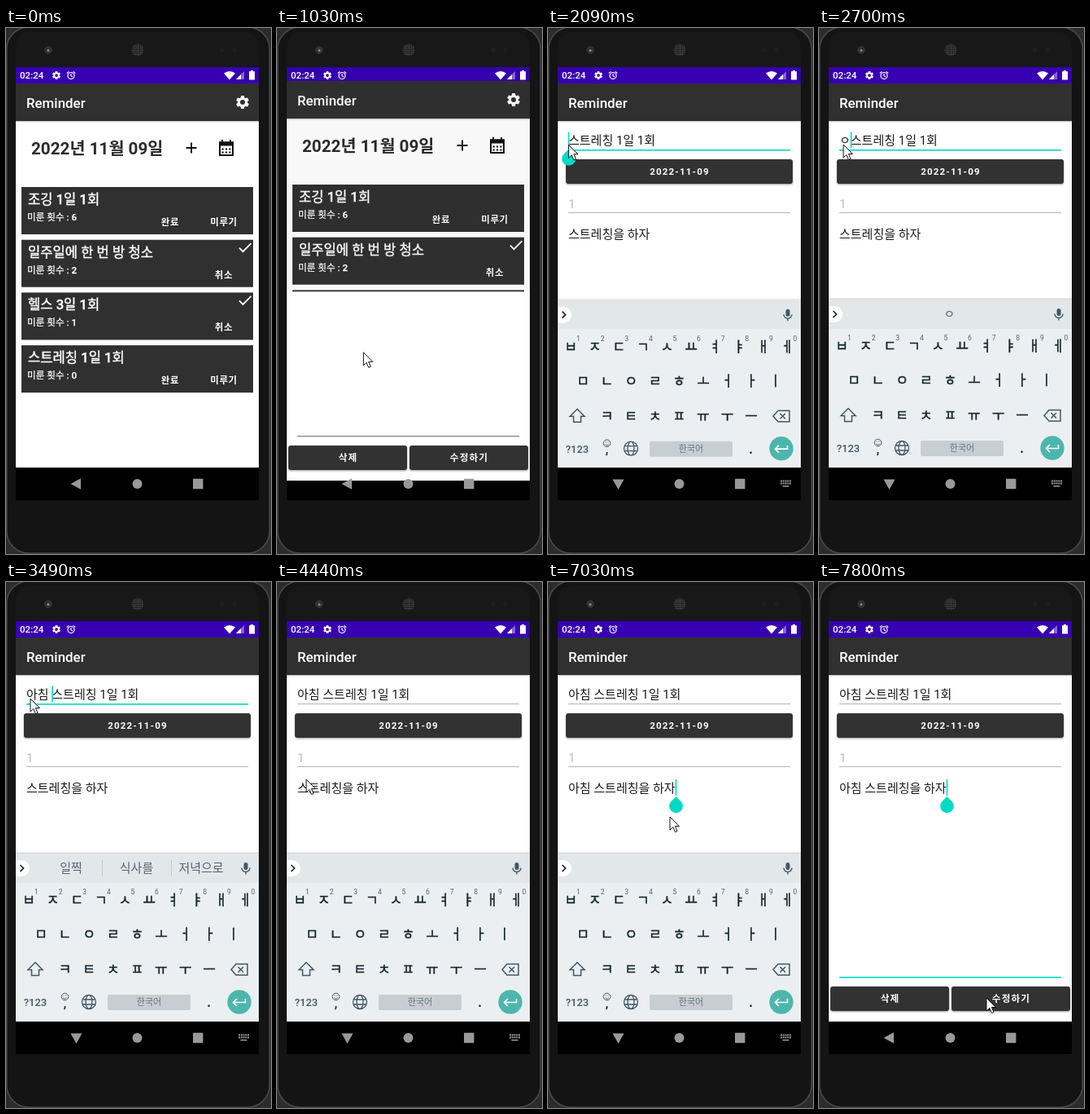
An HTML page for the animation above (8000 ms loop, 326x645 px).

```html
<!DOCTYPE html>
<html lang="ko">
<head>
<meta charset="utf-8">
<title>Reminder</title>
<style>
html, body { margin: 0; width: 100%; height: 100%; overflow: hidden; background: #2c2c2c; }
svg { display: block; width: 100%; height: 100%; font-family: Roboto, 'Noto Sans CJK KR', 'Noto Sans CJK', sans-serif; }
text { white-space: pre; }
</style>
</head>
<body>
<svg id="stage" viewBox="0 0 326 645">
  <defs>
    <clipPath id="screen"><rect x="12" y="48" width="299" height="531"/></clipPath>
    <clipPath id="content"><rect x="12" y="48" width="299" height="491"/></clipPath>
    <clipPath id="reveal"><rect id="revealBox" x="12" y="48" width="299" height="531"/></clipPath>
    <filter id="raise" x="-5%" y="-20%" width="110%" height="150%">
      <feDropShadow dx="0" dy="1" stdDeviation="1" flood-color="#000" flood-opacity=".4"/>
    </filter>
    <pattern id="mesh" width="2.6" height="2.6" patternUnits="userSpaceOnUse">
      <rect width="2.6" height="2.6" fill="#1c1c1c"/><circle cx="1.3" cy="1.3" r=".8" fill="#585858"/>
    </pattern>
    <path id="gear" d="M19.14 12.94a7 7 0 0 0 0-1.88l2.03-1.58a.5.5 0 0 0 .12-.61l-1.92-3.32a.5.5 0 0 0-.59-.22l-2.39.96a7 7 0 0 0-1.62-.94l-.36-2.54a.5.5 0 0 0-.48-.41h-3.84a.5.5 0 0 0-.47.41l-.36 2.54a7 7 0 0 0-1.62.94l-2.39-.96a.5.5 0 0 0-.59.22L2.74 8.87a.5.5 0 0 0 .12.61l2.03 1.58a7 7 0 0 0 0 1.88l-2.03 1.58a.5.5 0 0 0-.12.61l1.92 3.32a.5.5 0 0 0 .59.22l2.39-.96a7 7 0 0 0 1.62.94l.36 2.54a.5.5 0 0 0 .48.41h3.84a.5.5 0 0 0 .47-.41l.36-2.54a7 7 0 0 0 1.62-.94l2.39.96a.5.5 0 0 0 .59-.22l1.92-3.32a.5.5 0 0 0-.12-.61zM12 15.6a3.6 3.6 0 1 1 0-7.2 3.6 3.6 0 0 1 0 7.2z"/>
  </defs>

  <!-- phone body -->
  <rect width="326" height="645" fill="#2c2c2c"/>
  <rect x=".8" y="-1" width="323.5" height="645" rx="27" fill="#141414" stroke="#484848" stroke-width="1.6"/>
  <path d="M30 5H292Q311 5 311 26V48H12V26Q12 5 30 5Z" fill="#181818"/>
  <circle cx="52" cy="27" r="4.2" fill="#2c2e31" stroke="#3d3d3d"/>
  <circle cx="52" cy="27.5" r="1.6" fill="#7f8894"/>
  <circle cx="162" cy="27" r="7.6" fill="url(#mesh)"/>
  <circle cx="266" cy="27" r="3" fill="#1f1f1f"/><circle cx="281" cy="27" r="3" fill="#1d1d1d"/>

  <g clip-path="url(#screen)">
    <rect x="12" y="48" width="299" height="531" fill="#000"/>
    <g id="list"></g>
    <rect id="scrim" x="12" y="48" width="299" height="531" fill="#000"/>
    <g clip-path="url(#reveal)"><g id="detail"></g></g>
    <g clip-path="url(#content)"><g id="keyboard"></g></g>
    <g id="status"></g>
    <g fill="#999">
      <path id="back"/>
      <circle cx="161.5" cy="559" r="6"/>
      <rect x="230" y="552.8" width="12.4" height="12.4" rx=".6"/>
      <g id="imeIcon">
        <path d="M286 555.5h13M286 558.5h13" stroke="#999" stroke-width="2" stroke-dasharray="2 .75" fill="none"/>
        <path d="M288.5 561h8v1.5h-8z"/>
      </g>
    </g>
  </g>
  <path id="pointer" d="M0 0V16L3.8 12.5L6.4 18.6L9 17.5L6.4 11.5H11.4Z" fill="#fff" stroke="#111" stroke-width="1" stroke-linejoin="round"/>
</svg>

<script>
const LOOP = 8000;
const DARK = '#303030', TEAL = '#03dac5', KEY = '#14262e', ICON = '#405863';
const $ = id => document.getElementById(id);
const clamp = v => Math.max(0, Math.min(1, v));
const smooth = v => v * v * (3 - 2 * v);
const easeOut = (v, power = 3) => 1 - (1 - v) ** power;
const set = (el, attrs) => { for (const k in attrs) el.setAttribute(k, attrs[k]); };
const show = (id, on) => $(id).setAttribute('visibility', on ? 'visible' : 'hidden');

const rect = (x, y, w, h, fill, extra = '') =>
  `<rect x="${x}" y="${y}" width="${w}" height="${h}" fill="${fill}" ${extra}/>`;
const text = (x, y, size, fill, str, extra = '') =>
  `<text x="${x}" y="${y}" font-size="${size}" fill="${fill}" ${extra}>${str}</text>`;
const mid = (x, y, size, fill, str, extra = '') =>
  text(x, y, size, fill, str, 'text-anchor="middle" ' + extra);
const stroke = (d, color, width = 1.5, extra = '') =>
  `<path d="${d}" fill="none" stroke="${color}" stroke-width="${width}" ${extra}/>`;
const heavy = (color, width) => `font-weight="500" stroke="${color}" stroke-width="${width}"`;
const gear = (x, y, size) =>
  `<use href="#gear" fill="#fff" transform="translate(${x - size / 2} ${y - size / 2}) scale(${size / 24})"/>`;

// Window background with its system bars and title
const page = () =>
  rect(12, 68, 299, 471, '#fff') + rect(12, 539, 299, 40, '#000') +
  rect(12, 48, 299, 20, '#3700b3') + rect(12, 114, 299, 1, '#ccc') + rect(12, 115, 299, 1, '#eee') +
  rect(12, 68, 299, 46, DARK) + text(25, 97.8, 16.9, '#fff', 'Reminder', 'font-weight="500"');

function card(title, count, done, i) {
  const y = 195 + i * 64.7;
  const label = (x, str) => mid(x, y + 47, 11.4, '#fff', str, 'font-weight="700" letter-spacing=".7"');
  return rect(19, y, 285, 58, DARK) +
    text(27, y + 21, 16.6, '#fff', title, heavy('#fff', .4)) +
    text(26, y + 41, 11.6, '#fff', '미룬 횟수 : ' + count, heavy('#fff', .25)) +
    (done ? label(268, '취소') + stroke(`M287 ${y + 10}l4.5 4.5 10-10`, '#fff', 1.8)
          : label(202, '완료') + label(268, '미루기'));
}

function buildList() {
  const calendar = stroke('M263 140.5H279V156H263Z', '#111', 2) + rect(262, 139.5, 18, 5, '#111') +
    rect(265, 137, 2, 4, '#111') + rect(275, 137, 2, 4, '#111') +
    stroke('M265.5 148.5h11M265.5 152.5h11', '#111', 2, 'stroke-dasharray="2.2 2.2"');
  $('list').innerHTML = page() + gear(291, 91, 20) +
    text(31, 154.5, 20.7, '#2b2b2b', '2022년 11월 09일', 'font-weight="700"') +
    stroke('M221.5 147h13M228 140.5v13', '#111', 2) + calendar +
    [['조깅 1일 1회', 6, 0], ['일주일에 한 번 방 청소', 2, 1], ['헬스 3일 1회', 1, 1], ['스트레칭 1일 1회', 0, 0]]
      .map((c, i) => card(...c, i)).join('');
}

const button = (x, y, w, str) =>
  rect(x, y, w, 30, DARK, 'rx="3" filter="url(#raise)"') +
  mid(x + w / 2 + .5, y + 19.3, 11.6, '#fff', str, 'font-weight="700" letter-spacing="1.15"');

function buildDetail() {
  const line = (id, y) => rect(25, y, 273, 1, '#b5b5b5', `id="${id}"`);
  $('detail').innerHTML = page() +
    line('titleLine', 149) + text(25, 142.5, 15, '#1c1c1c', '', 'id="title"') +
    button(22, 161, 279, '2022-11-09') +
    text(25, 220.5, 15, '#bdbdbd', '1') + line('countLine', 226) +
    text(25, 257.5, 15, '#1c1c1c', '', 'id="memo"') + line('memoLine', 484) +
    button(14, 496, 146, '삭제') + button(163, 496, 146, '수정하기') +
    rect(-.8, 0, 1.6, 20, TEAL, 'id="caret"') +
    `<path id="handle" d="M0 0L6 6A8.4 8.4 0 1 1 -6 6Z" fill="${TEAL}"/>`;
}

function buildKeyboard() {
  const row = (keys, x, y) =>
    [...keys].map((k, i) => mid(x + i * 29.6, y + 6, 17, KEY, k, heavy(KEY, .4))).join('');
  const digits = [...'1234567890'].map((d, i) => mid(37.5 + i * 29.6, 383, 8.5, '#53656e', d)).join('');
  $('keyboard').innerHTML =
    rect(12, 331, 299, 1, '#eee') + rect(12, 332, 299, 1, '#d8d8d8') +
    rect(12, 333, 299, 36, '#e2e7e9') + rect(12, 369, 299, 170, '#ebeff2') +
    '<path d="M12 341H19a10 10 0 0 1 0 20H12Z" fill="#fff"/>' + stroke('M17.5 347l4 4-4 4', '#222', 1.7) +
    rect(292.5, 344, 5, 9, ICON, 'rx="2.5"') + stroke('M290 350.5a5 5 0 0 0 10 0M295 355.5v3', ICON, 1.4) +
    '<g id="hints">' + [80, 160.5, 240].map(x => mid(x, 356.3, 15, '#53656e', '')).join('') +
    stroke('M118.5 341v20M203.5 341v20', '#c6cdd1', 1) + '</g>' +
    row('ㅂㅈㄷㄱㅅㅛㅕㅑㅐㅔ', 28, 390) + digits +
    row('ㅁㄴㅇㄹㅎㅗㅓㅏㅣ', 43, 432) + row('ㅋㅌㅊㅍㅠㅜㅡ', 72.5, 475) +
    stroke('M36 466.5L45 475.5H40.5V482.5H31.5V475.5H27Z', ICON) +
    stroke('M283 468.5H297V482H283L277 475.2ZM285.5 472l6.5 6.5M292 472l-6.5 6.5', ICON) +
    mid(36, 520, 13, ICON, '?123', 'font-weight="500"') +
    stroke('M68.2 508.5a4.3 4.3 0 1 0 8.6 0a4.3 4.3 0 1 0-8.6 0M70.3 510q2.2 2.4 4.4 0M70.6 507h1M73.5 507h1', ICON, 1) +
    mid(72.5, 521.5, 14, KEY, ',', 'font-weight="700"') +
    stroke('M93.5 515a8.5 8.5 0 1 0 17 0a8.5 8.5 0 1 0-17 0M98 515a4 8.5 0 1 0 8 0a4 8.5 0 1 0-8 0M94.5 512h15M94.5 518h15', ICON, 1.3) +
    rect(125, 506, 102, 19, '#c7ced1', 'rx="2"') + mid(176, 519.3, 11, '#65757d', '한국어') +
    mid(249.5, 521, 16, KEY, '.', 'font-weight="700"') +
    '<circle cx="287" cy="515" r="14.7" fill="#4db6ac"/>' +
    stroke('M294.5 511v4.5H280M284 511l-4.5 4.5 4.5 4.5', '#fff', 1.7);
}

function buildStatus() {
  $('status').innerHTML = text(17, 62.2, 11.6, '#fff', '02:24', 'font-weight="500"') + gear(62, 58, 12.5) +
    '<circle cx="80" cy="58.5" r="4" fill="none" stroke="#fff" stroke-width="1.2"/>' +
    stroke('M80 56v2.8l2 1.2M74.8 55.5l2.6-2.2M85.2 55.5l-2.6-2.2', '#fff', 1.1) +
    '<path d="M268 55.5Q275 50.5 282 55.5L275 63.5Z" fill="#fff"/>' +
    '<path d="M293 53V63H283Z" fill="#fff" opacity=".4"/><path d="M289 57V63H283Z" fill="#fff"/>' +
    '<path d="M299 53.3h2v-1.3h3v1.3h2V63.5h-7Z" fill="#fff"/>';
}

// Pointer stops: time, x, y
const PATH = [
  [130, 284, 616], [830, 106, 424], [960, 106, 424], [1240, 108, 260], [1730, 26, 143], [2000, 26, 143],
  [2560, 17, 147], [2700, 30, 143], [3820, 30, 143], [4400, 36, 242], [4590, 36, 242], [4730, 9, 222],
  [6200, 9, 222], [6700, 152, 254], [6760, 152, 254], [6830, 150, 288], [7100, 150, 288], [7760, 206, 510]
];

// Edits: time, field, typed prefix, suggestions, caret x, handle
const NEXT = ['일찍', '식사를', '저녁으로'];
const NEAR = ['야', '아', '어'], WORD = ['아치', '아침', '아침에'];
const NONE = ['', '', ''], only = s => ['', s, ''];
const EDITS = [
  [0, '', '', NONE, 0, 0],
  [1830, 'title', '', NONE, 25.5, 1],
  [2500, 'title', 'ㅇ', only('ㅇ'), 39.5, 0],
  [2900, 'title', '아', NEAR, 39.5, 0],
  [3030, 'title', '앛', only('앛'), 39.5, 0],
  [3290, 'title', '아치', only('아치'), 53, 0],
  [3360, 'title', '아침', WORD, 53, 0],
  [3490, 'title', '아침 ', NEXT, 57, 0],
  [4400, '', '', NONE, 0, 0],
  [4570, 'memo', '', NONE, 39.5, 1],
  [4930, 'memo', '', NONE, 25.5, 0],
  [5400, 'memo', 'ㅇ', only('ㅇ'), 39.5, 0],
  [5480, 'memo', '아', NEAR, 39.5, 0],
  [5600, 'memo', '앛', only('앛'), 39.5, 0],
  [5700, 'memo', '아치', only('아치'), 53, 0],
  [5800, 'memo', '아침', WORD, 53, 0],
  [6000, 'memo', '아침 ', NEXT, 57, 0],
  [6750, 'memo', '아침 ', NEXT, 157.5, 1],
  [7030, 'memo', '아침 ', NONE, 157.5, 1]
];

function pointerAt(t) {
  let i = 0;
  while (i < PATH.length - 2 && t >= PATH[i + 1][0]) i++;
  const [a, b] = [PATH[i], PATH[i + 1]];
  const k = smooth(clamp((t - a[0]) / (b[0] - a[0])));
  return [a[1] + (b[1] - a[1]) * k, a[2] + (b[2] - a[2]) * k];
}

function drawLine(id, focused, idle) {
  set($(id), focused ? { fill: TEAL, height: 1.6 } : { fill: idle, height: 1 });
}

function drawEdit(t) {
  const past = EDITS.filter(e => e[0] <= t);
  const [, field, , hints, x, handle] = past[past.length - 1];
  const typed = name => past.reduce((s, e) => e[1] === name ? e[2] : s, '');
  $('title').textContent = typed('title') + '스트레칭 1일 1회';
  $('memo').textContent = typed('memo') + '스트레칭을 하자';

  // The blink restarts when the text or the caret position changes
  const [since] = past.filter((e, i) => !i || e[2] !== past[i - 1][2] || e[4] !== past[i - 1][4]).pop();
  const top = field === 'title' ? 127.5 : 242;
  set($('caret'), { transform: `translate(${x} ${top})` });
  set($('handle'), { transform: `translate(${x} ${top + 21})` });
  show('caret', field && (t - since) % 1000 < 500);
  show('handle', handle);
  drawLine('titleLine', field === 'title', t < 1830 ? '#6e6e6e' : '#b5b5b5');
  drawLine('memoLine', field === 'memo', '#6e6e6e');

  const [a, b, c, rules] = $('hints').children;
  [a, b, c].forEach((el, i) => el.textContent = hints[i]);
  set(rules, { visibility: hints[0] ? 'visible' : 'hidden' });
}

function draw(t) {
  const open = clamp((t - 985) / 425);
  const slide = easeOut(open, 2.7);
  const clip = 531 * easeOut(clamp(open / .55));
  set($('list'), { transform: `translate(0 ${Math.round(-11 * slide)})` });
  set($('scrim'), { opacity: .1 * slide });
  set($('detail'), { transform: `translate(0 ${Math.round(22 * (1 - slide))})` });
  set($('revealBox'), { y: 579 - clip, height: clip });

  const up = easeOut(clamp((t - 1870) / 260)) - smooth(clamp((t - 7130) / 230));
  set($('keyboard'), { transform: `translate(0 ${210 * (1 - up)})` });
  const ime = t >= 1870 && t < 7180;
  set($('back'), { d: ime ? 'M86.5 566L79.5 553.5H93.5Z' : 'M79.5 559L92 552.3V565.7Z' });
  show('imeIcon', ime);

  drawEdit(t);
  set($('pointer'), { transform: `translate(${pointerAt(t).join(' ')})` });
  show('pointer', t >= 130);
}

buildList();
buildDetail();
buildKeyboard();
buildStatus();
const begin = performance.now();
function tick() {
  draw((performance.now() - begin) % LOOP);
  requestAnimationFrame(tick);
}
tick();
</script>
</body>
</html>
```
